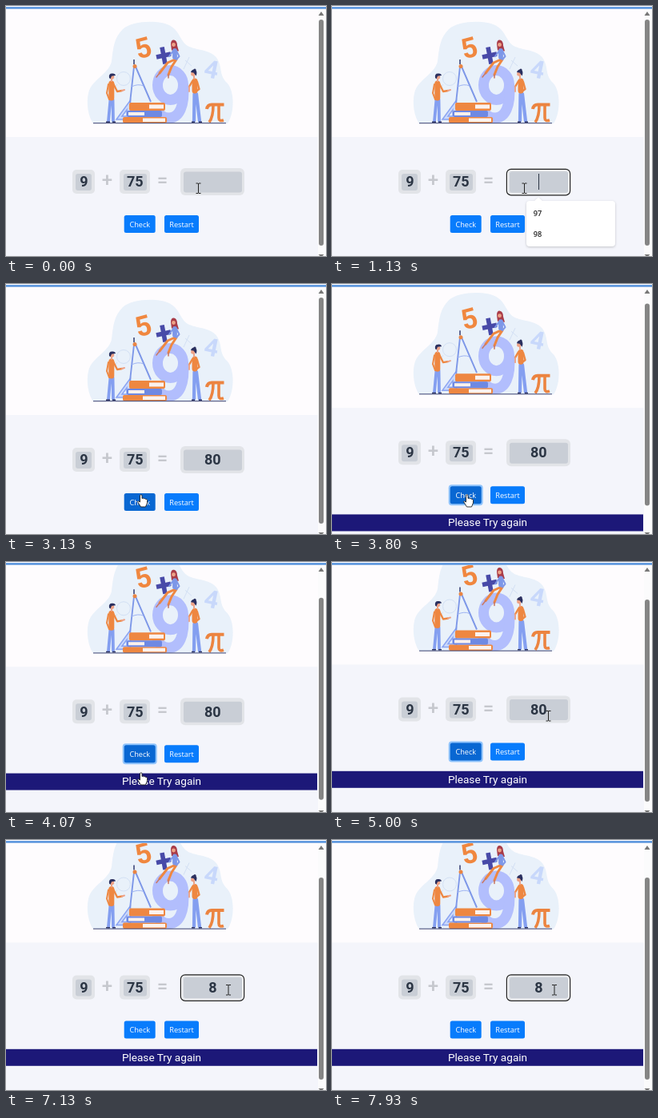
An HTML page that plays this animation: 400x313 px, repeating every 8 s.

```html
<!DOCTYPE html>
<html lang="en">
<head>
<meta charset="utf-8">
<title>Addition practice</title>
<style>
  html, body { margin: 0; width: 100%; height: 100%; overflow: hidden; background: #fff; }
  svg { display: block; width: 100%; height: 100%; }
  .num { font: 700 18px Roboto, sans-serif; fill: #2b3544; text-anchor: middle; }
  .sign { font: 500 24px Roboto, sans-serif; fill: #c6c8ce; text-anchor: middle; }
  .ui { font: 9.2px "Open Sans", sans-serif; }
  .label { fill: #fff; text-anchor: middle; }
  .option { font-weight: 600; fill: #222; }
  .tile { fill: #e2e4e8; }
  .slot { fill: #c9ced6; }
  .limb { fill: none; stroke-linecap: round; stroke-linejoin: round; }
</style>
</head>
<body>
<svg viewBox="0 0 400 313">
  <rect width="400" height="313" fill="#fefcfe"/>
  <g id="page">
    <rect y="164" width="390" height="260" fill="#f4f5fb"/>

    <!-- Illustration -->
    <path fill="#e9f1fa" d="M109 147C103 139 100 122 103 109C107 92 129 85 132 69C134 52 135 40 146 29C157 19 188 17 204 24C218 31 217 45 229 51C242 56 257 55 264 66C271 78 266 86 276 96C286 106 286 134 277 147Z"/>
    <g fill="none" stroke="#d3e0f4">
      <circle cx="147" cy="91" r="8.5"/>
      <path d="M139 98l-5 7M224 68l8 7m-3-11l-7 15"/>
    </g>
    <g font-family="Roboto, sans-serif" font-weight="700" text-anchor="middle">
      <text x="171.500" y="64.500" font-size="35" fill="#f0873f" transform="rotate(-15 171.500 52)">5</text>
      <text x="257" y="90" font-size="31" fill="#c8d8fb" transform="rotate(12 257 79.500)">4</text>
    </g>
    <g fill="none" stroke="#b2befd" stroke-width="13">
      <ellipse cx="205.500" cy="99" rx="16" ry="18.500"/>
      <path d="M221.500 98C224 126 216 140 204 140C196 140 191 136 189 129"/>
    </g>
    <path d="M188 64l18-4M195 51.500l4 21" stroke="#484aa8" stroke-width="5.600"/>
    <g fill="none" stroke="#ec8440">
      <path d="M251 129q1-5.500 6-5.500H272.500" stroke-width="4"/>
      <path d="M259 124q0 15-5 21.500M266 124v16q0 5 6 3" stroke-width="3.600"/>
    </g>

    <!-- Set square, compass and books -->
    <path d="M138 142L155.500 118V142ZM145 138h6v-8Z" fill="#cbd9fb" stroke="#8ba4f2" stroke-width="1.500"/>
    <path d="M160 76L155 121M162 76L181 120" stroke="#7d97e8" stroke-width="1.900"/>
    <path d="M157 101q8-4 15-1" fill="none" stroke="#9db3f3"/>
    <path d="M160 67v6" stroke="#303a70" stroke-width="1.500"/>
    <circle cx="161" cy="75.500" r="2.500" fill="#e98543"/>
    <g fill="#ee8741">
      <rect x="154" y="121" width="45" height="10" rx="2"/>
      <rect x="146" y="139" width="55" height="7.500" rx="2"/>
    </g>
    <rect x="151" y="131" width="44" height="8" rx="2" fill="#6e89e3"/>
    <path d="M179 123.500h18v5h-18zM171 140.500h28v4.500h-28zM153 133h20v4h-20z" fill="#fbf2ee"/>

    <!-- Standing man -->
    <g class="limb">
      <path d="M130.500 117L128 144M133.500 117L134 144" stroke="#849ff0" stroke-width="3.800"/>
      <path d="M131.800 97V115" stroke="#ee8741" stroke-width="7"/>
      <path d="M134 97L139 107L145 106" stroke="#ee8741" stroke-width="2.300"/>
      <path d="M128 98L126 109L129 117" stroke="#ee8741" stroke-width="2"/>
      <path d="M145 106l3-1M132 90v4" stroke="#eda287" stroke-width="2"/>
    </g>
    <circle cx="132.500" cy="89" r="2.700" fill="#eda287"/>
    <path d="M129 90q-1-5.500 3.500-5.500q4-.500 4.500 2.500l-5 .700l-1.500 3.500z" fill="#2b305f"/>

    <!-- Seated woman -->
    <path d="M206 48q0-6 4-5.500q4 1 4 7l2 7l-9-1z" fill="#a93c48"/>
    <g class="limb">
      <path d="M211 67L202 71L192 84M213 67L207 76L203 86" stroke="#ee8741" stroke-width="3"/>
      <path d="M192 84l-4 5M203 86l0 4" stroke="#c97a68" stroke-width="1.600"/>
      <path d="M211 56V64" stroke="#7d97e8" stroke-width="5.800"/>
      <path d="M209 56L204 63M213 56L216.500 63L213 67" stroke="#7d97e8" stroke-width="2"/>
    </g>
    <circle cx="209.500" cy="48.500" r="2.400" fill="#eda287"/>

    <!-- Standing woman -->
    <g class="limb">
      <path d="M235.500 110L235 144M238 110L242 144" stroke="#849ff0" stroke-width="4.200"/>
      <path d="M236 94V106" stroke="#ee8741" stroke-width="7"/>
      <path d="M233 94L229 101M239 95L241.500 104L236 108" stroke="#ee8741" stroke-width="2.400"/>
      <path d="M229 101l0 6M235 87v4" stroke="#eda287" stroke-width="1.900"/>
    </g>
    <circle cx="233.800" cy="85" r="2.700" fill="#eda287"/>
    <path d="M231 83q1-4 5-3.500q4 2 1.500 8l-3-4z" fill="#2b305f"/>
    <circle cx="236" cy="80" r="1.600" fill="#2b305f"/>
    <path d="M109 146.700H275" stroke="#3a4070"/>
    <path d="M125 145.300h5m3 0h4M232 145.300h4m5 0h4" stroke="#2b305f" stroke-width="1.500"/>

    <!-- Sum -->
    <rect class="tile" x="83" y="205" width="28" height="30" rx="5"/>
    <rect class="slot" x="87" y="210" width="20" height="21" rx="3"/>
    <text class="num" x="97.300" y="226.300">9</text>
    <text class="sign" x="126.500" y="226">+</text>
    <rect class="tile" x="142" y="205" width="38" height="30" rx="5"/>
    <rect class="slot" x="147" y="210" width="29" height="21" rx="3"/>
    <text class="num" x="161.300" y="226.300">75</text>
    <text class="sign" x="195.500" y="226.200">=</text>
    <rect class="tile" x="218" y="203" width="80" height="34" rx="6"/>
    <rect class="slot" x="222" y="207.500" width="73" height="26" rx="3"/>
    <g id="fieldRing" fill="none">
      <rect x="219.500" y="205.400" width="77" height="30.400" rx="4.500" stroke="#fff"/>
      <rect x="218.400" y="204.300" width="79.200" height="32.600" rx="5.500" stroke="#222" stroke-width="1.200"/>
    </g>
    <text id="answer" class="num" x="258.300" y="226.300"></text>
    <rect id="caret" y="210" width="1" height="20" fill="#2b3544"/>

    <!-- Buttons -->
    <rect id="checkRing" x="145.700" y="260" width="43" height="26" rx="4" fill="#8fc3fb"/>
    <rect id="check" x="147.700" y="262" width="39" height="22" rx="2.500"/>
    <rect x="198" y="262" width="43" height="22" rx="2.500" fill="#087cfc"/>
    <text class="ui label" x="167.300" y="276.800">Check</text>
    <text class="ui label" x="219.500" y="276.800">Restart</text>

    <g id="message">
      <rect y="297.300" width="389" height="21" fill="#1c1878"/>
      <text x="194.500" y="312.200" font-family="Roboto, sans-serif" font-size="13.600" fill="#fff" text-anchor="middle">Please Try again</text>
    </g>
  </g>

  <g id="popup">
    <path d="M247 244H253L258 239.500L263 244H350Q354 244 354 248V297Q354 301 350 301H247Q243 301 243 297V248Q243 244 247 244Z" fill="#fff" style="filter:drop-shadow(0 1px 1.500px #0003)"/>
    <text class="ui option" x="251.800" y="263">97</text>
    <text class="ui option" x="251.800" y="289">98</text>
  </g>

  <!-- Browser frame -->
  <rect x="390" width="10" height="313" fill="#fbfbfc"/>
  <rect width="400" height="4" fill="#fefcfe"/>
  <rect y="1.200" width="400" height="2.400" fill="#4e8edb"/>
  <path d="M394 7l3.500 5h-7zM390.500 311h7l-2 2h-3z" fill="#777"/>
  <rect id="thumb" x="391" width="6" rx="3" fill="#858585"/>

  <!-- Pointers -->
  <path id="beam" d="M-3-6h2.500l.5.500l.5-.500H3M0-6V6M-3 6.500h2.500l.5-.500l.5.500H3" fill="none" stroke="#222"/>
  <path id="hand" d="M-2.500-6.500q1.500-1.500 2.500 0V-2.500q1.500-1 2.300.300q1.500-.700 2.200.600q1.800-.300 2 1.200V3L4.500 8H-1.500L-5.500 1.500q.500-1.500 3 .500Z" fill="#fff" stroke="#222" stroke-width=".9"/>
  <path id="arrow" d="M0-6V7l3-3l2 4.500l2-1L5 3.500H9Z" fill="#fff" stroke="#222" stroke-width=".9"/>
</svg>
<script>
  const LOOP = 8000, SCROLL = 35.5;
  const el = id => document.getElementById(id);
  const show = (id, on) => { el(id).style.display = on ? "" : "none"; };
  const clamp01 = v => Math.min(1, Math.max(0, v));
  const between = (t, a, b) => t >= a && t < b;

  // Pointer stops: time, x, y
  const path = [[0, 240.5, 228], [2150, 240.5, 228], [2600, 170, 271], [4400, 170, 271],
                [5000, 270.5, 192.5], [5250, 278, 187.5], [LOOP, 278, 187.5]];
  // Key presses and clicks in the field: time, value afterwards
  const edits = [[0, ""], [700, ""], [1450, "8"], [1850, "80"], [5300, "80"], [6400, "8"]];

  function pointerAt(t) {
    const i = path.findIndex(stop => stop[0] > t);
    const [t0, x0, y0] = path[i - 1], [t1, x1, y1] = path[i];
    const u = (t - t0) / (t1 - t0), s = u * u * (3 - 2 * u);
    return [x0 + (x1 - x0) * s, y0 + (y1 - y0) * s];
  }

  function render(t) {
    const [edited, value] = edits.findLast(e => e[0] <= t);
    const focused = between(t, 700, 3080) || t >= 5300;
    const checkFocused = between(t, 3180, 5300);
    const hasMessage = t >= 3300;
    const scroll = SCROLL * (1 - (1 - clamp01((t - 3750) / 560)) ** 3);

    el("page").setAttribute("transform", `translate(0 ${-scroll})`);
    el("answer").textContent = value;
    el("caret").setAttribute("x", 258 + value.length * 5.2);
    show("caret", focused && (t - edited) % 1000 < 500);
    show("fieldRing", focused);
    show("popup", between(t, 750, 1450));
    show("message", hasMessage);
    show("checkRing", checkFocused);
    el("check").setAttribute("fill", between(t, 2500, 5300) ? "#0967d2" : "#087cfc");

    const top = 17 + scroll * 30 / SCROLL;
    el("thumb").setAttribute("y", top);
    el("thumb").setAttribute("height", hasMessage ? 253 : 283);

    const [x, y] = pointerAt(t);
    const overField = x > 218 && x < 298 && Math.abs(y + scroll - 220) < 17;
    const shape = overField ? "beam" : between(t, 2450, 4450) ? "hand" : "arrow";
    for (const id of ["beam", "hand", "arrow"]) show(id, id === shape);
    el(shape).setAttribute("transform", `translate(${x} ${y})`);
  }

  const start = performance.now();
  function tick() {
    render((performance.now() - start) % LOOP);
    requestAnimationFrame(tick);
  }
  tick();
</script>
</body>
</html>
```
